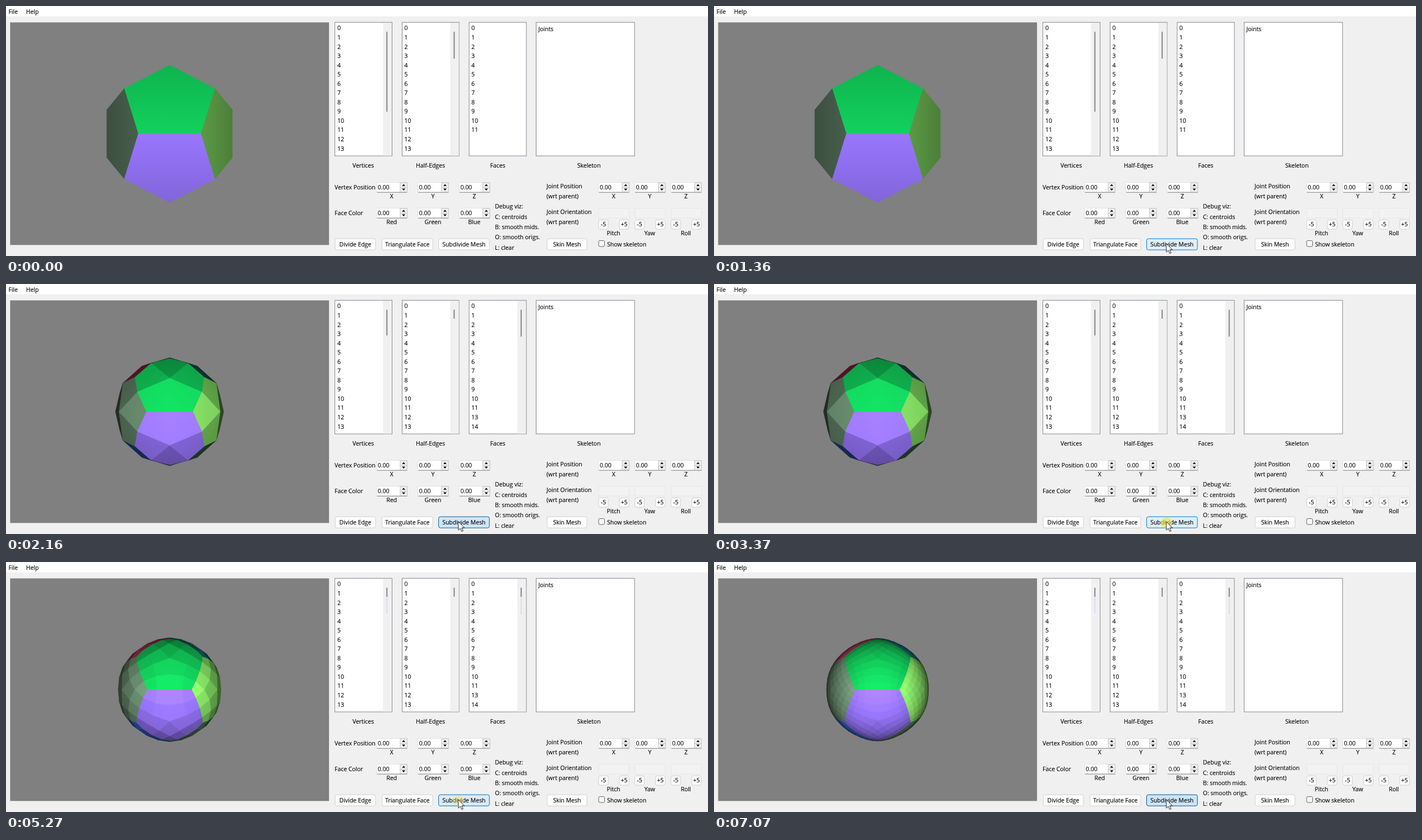
Recreate the animation shown at these times as an HTML page with a canvas. Size 1252 px wide and 447 px high, loop 8 s.

```html
<!DOCTYPE html>
<html lang="en">
<head>
<meta charset="utf-8">
<title>Mesh subdivision</title>
<style>
  html, body { margin: 0; width: 1252px; height: 447px; overflow: hidden; background: #f0f0f0; }
  svg, canvas { position: absolute; left: 0; top: 0; display: block; }
  canvas { left: 7px; top: 29px; }
  text { font: 10.45px "Open Sans", "Noto Sans", sans-serif; fill: #000; stroke: #000; stroke-width: .12; white-space: pre; }
  .mid { text-anchor: middle; }
  .list { fill: #fff; stroke: #828790; }
  .track { fill: #f0f0f0; }
  .thumb { fill: #858585; }
  .trail { fill: #dcdcf4; }
  .btn { fill: #fdfdfd; stroke: #d0d0d0; }
  .spin { fill: #fff; stroke: #e2e2e2; }
  .line { stroke: #868686; }
  .step { fill: #f0f0f0; stroke: #c4c4c4; }
  .off { fill: #f2f2f2; stroke: #e6e6e6; }
</style>
</head>
<body>
<svg id="ui" width="1252" height="447" viewBox="0 0 1252 447"></svg>
<script>
const LOOP = 8000;
const LEVEL_TIMES = [0, 2110, 3660, 6120, LOOP];

// ---------- interface ----------
const text = (x, y, s, cls = '') => `<text x="${x}" y="${y}" class="${cls}">${s}</text>`;
const mid = (x, y, s) => text(x, y, s, 'mid');
const rect = (x, y, w, h, cls, extra = '') =>
  `<rect x="${x}" y="${y}" width="${w}" height="${h}" class="${cls}" ${extra}/>`;

const rowY = i => 43.4 + i * 16.55;
const rows = (x, from, to, shift = 0) => {
  let s = '';
  for (let i = from; i < to; i++) s += text(x, rowY(i), i + shift);
  return s;
};
const list = (x, w) => rect(x + .5, 29.2, w, 238.8, 'list');
const track = x => rect(x, 30, 15, 237.5, 'track');
const thumb = (x, bottom, cls = 'thumb') => rect(x, 46, 2, bottom - 46, cls);
const button = (x, w, label, id = '') =>
  rect(x + .6, 416.1, w, 20, 'btn', `rx="3" ${id && `id="${id}"`}`) +
  mid(x + w / 2 + .5, 430.3, label);

function spin(x, y, label) {
  const a = x + 48;
  return rect(x + .5, y + .5, 54.5, 17.5, 'spin', 'rx="1.5"') +
    `<path class="line" d="M${x + 1} ${y + 18.2}h54"/>` +
    rect(a - 5.5, y + 1, 12.5, 8.5, 'step') + rect(a - 5.5, y + 9.5, 12.5, 8, 'step') +
    `<path d="M${a - 2.3} ${y + 6.8}l3-3.4 3 3.4zM${a - 2.3} ${y + 11.5}l3 3.4 3-3.4z"/>` +
    text(x + 2.5, y + 13.3, '0.00') + mid(x + 27.3, y + 29, label);
}

function turn(x, label) {
  const key = (kx, s) =>
    rect(kx + .5, 382.5, 17, 16.5, 'btn', 'rx="3"') + mid(kx + 9, 394.3, s);
  return rect(x + .5, 361.5, 54.5, 17.5, 'off') +
    key(x, '-5') + key(x + 37, '+5') + mid(x + 27, 410.3, label);
}

const thumbs = [
  thumb(678.3, 189) + thumb(798.3, 94),
  thumb(678.3, 92) + thumb(798.3, 62) + thumb(917.8, 94),
  thumb(678.3, 92, 'trail') + thumb(917.8, 94, 'trail') +
    thumb(678.3, 62) + thumb(798.3, 62) + thumb(917.8, 62)
];

document.getElementById('ui').innerHTML = [
  rect(0, 0, 1252, 18.5, '', 'fill="#fff"'),
  text(4.5, 13.7, 'File'), text(35.7, 13.7, 'Help'),
  rect(7.4, 29.3, 568.7, 398, '', 'fill="#808080"'),

  list(586, 102), list(706, 101.5), list(825.5, 102), list(945, 175.5),
  track(672.5), track(792.5),
  rows(591, 0, 14), rows(710.6, 0, 14), rows(830, 0, 12),
  text(949.5, 45, 'Joints'),
  mid(637, 289, 'Vertices'), mid(757, 289, 'Half-Edges'),
  mid(877, 289, 'Faces'), mid(1039.7, 289, 'Skeleton'),
  `<g id="more">${track(912)}${rows(830, 12, 14, 1)}</g>`,
  thumbs.map((s, i) => `<g id="thumbs${i}">${s}</g>`).join(''),

  text(586, 328.2, 'Vertex Position'), text(586, 374.3, 'Face Color'),
  ['X', 'Y', 'Z'].map((s, i) =>
    spin(660.5 + i * 73.7, 315, s) + spin(1056.5 + i * 64.5, 315, s)).join(''),
  ['Red', 'Green', 'Blue'].map((s, i) => spin(660.5 + i * 73.7, 361, s)).join(''),
  ['Pitch', 'Yaw', 'Roll'].map((s, i) => turn(1056.5 + i * 64.5, s)).join(''),

  ['Debug viz:', 'C: centroids', 'B: smooth mids.', 'O: smooth origs.', 'L: clear']
    .map((s, i) => text(872, 362.2 + i * 18.4, s)).join(''),
  text(964, 325.8, 'Joint Position'), text(964, 344.3, '(wrt parent)'),
  text(964, 371.8, 'Joint Orientation'), text(964, 390.3, '(wrt parent)'),

  button(586.5, 72, 'Divide Edge'), button(670, 90.5, 'Triangulate Face'),
  button(771, 90.5, 'Subdivide Mesh', 'subdivide'), button(964.5, 71, 'Skin Mesh'),
  rect(1057, 419.5, 10.5, 10.5, '', 'rx="2" fill="#f6f6f6" stroke="#666"'),
  text(1072, 430, 'Show skeleton'),

  '<circle id="click" cx="807" cy="427" r="10" fill="#ece63c" fill-opacity=".62"/>',
  '<path id="cursor" d="M0 0V15.2L3.5 12 6 17.6 8.4 16.5 6 11.1H10.7Z" fill="#fff" stroke="#000" stroke-width=".9"/>'
].join('');

// ---------- mesh ----------
const PHI = (1 + Math.sqrt(5)) / 2;
const W = 569, H = 398, EYE = 6.94;
const FOCAL = H / 2 / Math.tan(Math.PI / 8);

const dot = (a, b) => a[0] * b[0] + a[1] * b[1] + a[2] * b[2];
const sub = (a, b) => a.map((v, i) => v - b[i]);
const scale = (a, k) => a.map(v => v * k);
const unit = a => scale(a, 1 / Math.hypot(...a));
const cross = (a, b) => [a[1] * b[2] - a[2] * b[1], a[2] * b[0] - a[0] * b[2], a[0] * b[1] - a[1] * b[0]];
const mean = pts => [0, 1, 2].map(i => pts.reduce((s, p) => s + p[i], 0) / pts.length);
const shift = (a, k) => [0, 1, 2].map(i => a[(i - k + 3) % 3]);

// Base colours, in the order the faces are generated below
const COLORS = [
  [17, 200, 88], [146, 246, 110], [30, 145, 145],
  [90, 90, 90], [115, 153, 121], [100, 155, 110],
  [146, 113, 243], [95, 130, 95], [235, 65, 115],
  [90, 90, 90], [95, 120, 100], [65, 122, 248]
];

function dodecahedron() {
  const verts = [], faces = [], normals = [];
  for (const a of [1, -1]) for (const b of [1, -1]) {
    verts.push([a, b, 1], [a, b, -1]);
    for (let k = 0; k < 3; k++) {
      verts.push(shift([a / PHI, 0, b * PHI], k));
      normals.push(shift([0, a, b * PHI], k));
    }
  }
  normals.forEach((n, f) => {
    const ids = verts.map((_, i) => i).filter(i => dot(verts[i], n) > 2.6);
    const c = mean(ids.map(i => verts[i]));
    const u = sub(verts[ids[0]], c), w = cross(unit(n), u);
    const angle = i => Math.atan2(dot(sub(verts[i], c), w), dot(sub(verts[i], c), u));
    ids.sort((i, j) => angle(i) - angle(j));
    faces.push({ ids, color: COLORS[f] });
  });
  return { verts, faces };
}

// One Catmull-Clark step
function subdivide({ verts, faces }) {
  const centers = faces.map(f => mean(f.ids.map(i => verts[i])));
  const around = verts.map(() => ({ centers: [], mids: [] }));
  const edges = new Map();
  const key = (a, b) => Math.min(a, b) + '-' + Math.max(a, b);

  faces.forEach(({ ids }, f) => ids.forEach((a, i) => {
    const b = ids[(i + 1) % ids.length], k = key(a, b);
    around[a].centers.push(centers[f]);
    if (!edges.has(k)) {
      edges.set(k, { index: verts.length + edges.size, pts: [verts[a], verts[b]] });
      const m = mean([verts[a], verts[b]]);
      around[a].mids.push(m);
      around[b].mids.push(m);
    }
    edges.get(k).pts.push(centers[f]);
  }));

  const moved = verts.map((v, i) => {
    const { centers: c, mids: m } = around[i], n = c.length;
    const fc = mean(c), em = mean(m);
    return v.map((x, j) => (fc[j] + 2 * em[j] + (n - 3) * x) / n);
  });
  const first = verts.length + edges.size;
  const quads = faces.flatMap(({ ids, color }, f) => ids.map((a, i) => {
    const next = ids[(i + 1) % ids.length], prev = ids[(i + ids.length - 1) % ids.length];
    return { ids: [a, edges.get(key(a, next)).index, first + f, edges.get(key(prev, a)).index], color };
  }));
  return { verts: [...moved, ...[...edges.values()].map(e => mean(e.pts)), ...centers], faces: quads };
}

const toEye = p => [-p[0], -p[1], EYE - p[2]];

function project(p) {
  const s = FOCAL / (EYE - p[2]);
  return [p[0] * s, -p[1] * s];
}

function shade(color, normal, p) {
  const light = Math.max(0, dot(normal, unit(toEye(p)))) + .2;
  return `rgb(${color.map(c => Math.min(255, Math.round(c * light))).join()})`;
}

function paint({ verts, faces }) {
  const canvas = document.createElement('canvas');
  canvas.width = W;
  canvas.height = H;
  const g = canvas.getContext('2d');
  g.translate(W / 2 + .25, H / 2 + .35);
  g.lineWidth = .5;
  g.lineJoin = 'round';

  const shapes = [];
  for (const { ids, color } of faces) {
    const pts = ids.map(i => verts[i]), c = mean(pts);
    const normal = unit(mean(pts.map((p, i) => cross(sub(p, c), sub(pts[(i + 1) % pts.length], c)))));
    if (dot(normal, toEye(c)) <= 0) continue;

    // Light falls off outwards from the middle of the view
    const flat = pts.map(project), [cx, cy] = project(c), r = Math.hypot(cx, cy) || 1;
    const ux = cx / r, uy = cy / r;
    const reach = flat.map(([x, y]) => x * ux + y * uy);
    const lo = Math.min(...reach), hi = Math.max(...reach);
    const fill = g.createLinearGradient(ux * lo, uy * lo, ux * hi, uy * hi);
    fill.addColorStop(0, shade(color, normal, pts[reach.indexOf(lo)]));
    fill.addColorStop(1, shade(color, normal, pts[reach.indexOf(hi)]));

    const path = new Path2D();
    flat.forEach(([x, y]) => path.lineTo(x, y));
    path.closePath();
    shapes.push({ path, fill });
  }
  // Strokes go below all fills: they close the seams without moving the edges
  for (const { path, fill } of shapes) {
    g.strokeStyle = fill;
    g.stroke(path);
  }
  for (const { path, fill } of shapes) {
    g.fillStyle = fill;
    g.fill(path);
  }
  document.body.append(canvas);
  return canvas;
}

// ---------- motion ----------
const byId = id => document.getElementById(id);

// Each key is [time in ms, properties]
function animate(el, keys) {
  const frames = keys.map(([t, props]) => ({ offset: t / LOOP, ...props }));
  el.animate(frames, { duration: LOOP, iterations: Infinity }).startTime = 0;
}

function showBetween(el, from, to) {
  const keys = [[from, { opacity: 1 }]];
  if (from > 0) keys.unshift([0, { opacity: 0 }]);
  if (to < LOOP) keys.push([to, { opacity: 0 }]);
  keys.push([LOOP, { opacity: to < LOOP ? 0 : 1 }]);
  animate(el, keys.map(([t, p]) => [t, { ...p, easing: 'step-end' }]));
}

let mesh = dodecahedron();
for (let level = 0; level < 4; level++) {
  showBetween(paint(mesh), LEVEL_TIMES[level], LEVEL_TIMES[level + 1]);
  if (level < 3) mesh = subdivide(mesh);
}
showBetween(byId('thumbs0'), 0, LEVEL_TIMES[1]);
showBetween(byId('thumbs1'), LEVEL_TIMES[1], LEVEL_TIMES[2]);
showBetween(byId('thumbs2'), LEVEL_TIMES[2], LOOP);
showBetween(byId('more'), LEVEL_TIMES[1], LOOP);

const idle = { fill: '#fdfdfd', stroke: '#d0d0d0' };
const hover = { fill: '#e0eef9', stroke: '#0078d4' };
const pressed = { fill: '#cce4f7', stroke: '#005499' };
animate(byId('subdivide'), [
  [0, idle], [1000, idle], [1300, hover],
  [1820, hover], [2030, pressed], [2110, pressed], [2370, hover],
  [3370, hover], [3580, pressed], [3660, pressed], [3920, hover],
  [5190, hover], [5460, pressed], [6120, pressed], [6330, hover],
  [6870, hover], [7070, pressed], [LOOP, pressed]
]);

const glow = (t, opacity) => [t, { opacity, easing: 'step-end' }];
animate(byId('click'), [
  glow(0, 0),
  ...[1820, 3370, 5190, 6870].flatMap(t => [glow(t, 1), glow(t + 70, .6), glow(t + 140, .3), glow(t + 200, 0)]),
  glow(LOOP, 0)
]);

const at = (t, x, y) => [t, { transform: `translate(${x}px, ${y}px)` }];
animate(byId('cursor'), [
  at(0, 1150, 304), at(390, 1150, 304), at(540, 1040, 338), at(670, 905, 376),
  at(800, 815, 400), at(870, 801.5, 404), at(950, 801.5, 404), at(1140, 805.5, 422),
  at(1360, 806.7, 424.8), at(LOOP, 806.7, 424.8)
]);
showBetween(byId('cursor'), 390, LOOP);
</script>
</body>
</html>
```
